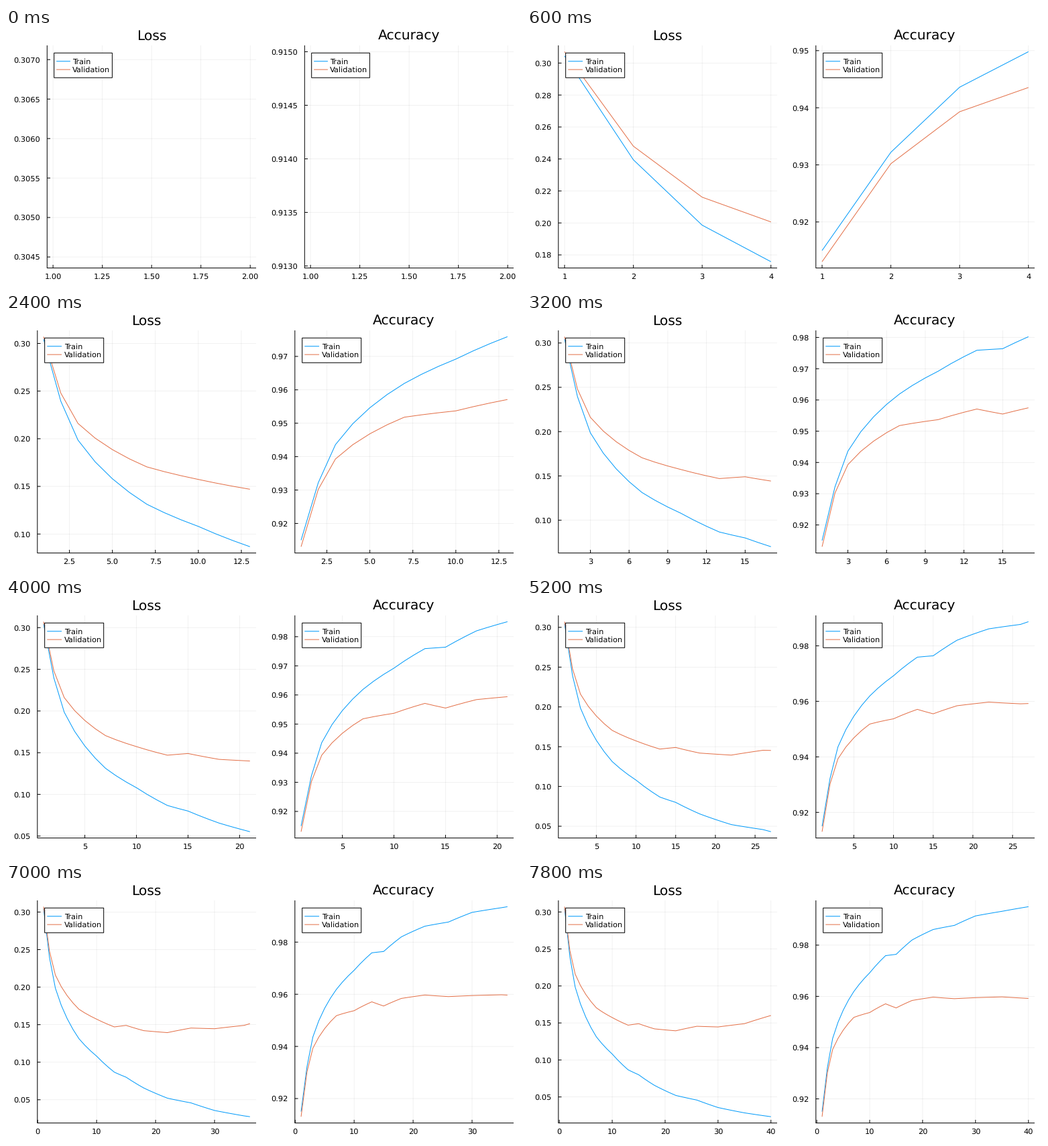
A matplotlib script for the animation above (8000 ms loop, 768x384 px).

```python
import math

import matplotlib.pyplot as plt
import numpy as np
from matplotlib.animation import FuncAnimation
from matplotlib.patches import Rectangle

W, H, DPI = 768, 384, 100
PT = 72 / DPI                      # points per pixel
EPOCHS, INTERVAL = 40, 200
TOP, BOTTOM = 26, 358.6
BLUE, ORANGE = "#009AFA", "#E36F47"
SMALL, LARGE = 11.4, 20.3          # text sizes in pixels
DIGIT = 0.636 * SMALL
NICE = [(5, 0.9), (3, 0.2), (2.5, 0.5), (2, 0.7), (1, 1.0)]

plt.rcParams.update({"font.family": "DejaVu Sans", "text.hinting": "none",
                     "path.snap": False})


def curve(*values):
    """Metric per epoch, straight in log(epoch) between the knots."""
    knots = [1, 2, 3, 7, 10, 13, 15, 18, 22, 26, 30, 35, 40]
    return np.interp(np.log(np.arange(1, EPOCHS + 1)), np.log(knots), values)


train_loss = curve(.30444, .2395, .1986, .1313, .108, .0867, .080,
                   .0656, .0521, .0458, .0357, .0285, .0233)
val_loss = curve(.3071, .248, .2161, .1705, .1573, .147, .149,
                 .142, .1394, .1455, .1446, .149, .1601)
train_acc = curve(.915, .9322, .9436, .9619, .9692, .9759, .9764,
                  .982, .9861, .9877, .9914, .9932, .995)
val_acc = curve(.91304, .9302, .9393, .9518, .9537, .9571, .9555,
                .9584, .9597, .9591, .9595, .9598, .9592)


def widen(lo, hi):
    if hi <= lo:
        hi = lo + 1
    pad = 0.03 * (hi - lo)
    return lo - pad, hi + pad


def nice_ticks(lo, hi):
    """Tick values and decimals with the best count, coverage and step."""
    span = hi - lo
    top = math.ceil(math.log10(span))
    best, result = -math.inf, None
    for power in range(top, top - 4, -1):
        for q, niceness in NICE:
            step = q * 10.0 ** power
            first, last = math.ceil(lo / step), math.floor(hi / step)
            count = last - first + 1
            if not 4 <= count <= 8:
                continue
            cover = math.ceil(hi / step)
            zero = lo <= 0 or (cover < 16 and cover * step < 2 * span)
            score = ((1 - abs(count - 5) / 5) / 4 + zero / 6
                     + 0.5 * span / ((count - 1) * step) + niceness / 4)
            if score > best + 1e-9:
                best = score
                decimals = max(0, -power + (q == 2.5))
                result = np.arange(first, last + 1) * step, decimals
    return result


fig = plt.figure(figsize=(W / DPI, H / DPI), dpi=DPI, facecolor="white")
ax = fig.add_axes([0, 0, 1, 1])


def line(xs, ys, color="black", width=1.0, z=2, **kw):
    ax.plot(xs, ys, color=color, lw=width * PT, zorder=z,
            solid_capstyle="butt", solid_joinstyle="round", **kw)


def grid(xs, ys):
    line(xs, ys, width=0.7, z=1, alpha=0.08)


def text(x, y, s, size=SMALL, ha="center", z=4):
    ax.text(x, y, s, fontsize=size * PT, ha=ha, va="baseline",
            color="black", zorder=z)


def legend(left, width):
    x, y = left + width / 30, TOP + 11.3
    gap, sample = width / 90, width / 15
    start = x + 2 * gap + sample
    ax.add_patch(Rectangle((x, y), start - x + 59, 37, fc="white",
                           ec="black", lw=PT, zorder=5))
    rows = (("Train", BLUE, 49.7), ("Validation", ORANGE, 62.1))
    for label, color, row in rows:
        line([x + gap, x + gap + sample], [row, row], color, z=6)
        text(start, row + 4.2, label, ha="left", z=6)


def panel(offset, title, train, val, n):
    epochs = np.arange(1, n + 1)
    both = np.concatenate([train[:n], val[:n]])
    x0, x1 = widen(1, n)
    y0, y1 = widen(both.min(), both.max())
    xticks, xdec = nice_ticks(x0, x1)
    yticks, ydec = nice_ticks(y0, y1)

    left = offset + 46.8 + DIGIT * (ydec - 2)
    right = offset + 373
    width = right - left

    def px(x):
        return left + (x - x0) / (x1 - x0) * width

    def py(y):
        return BOTTOM - (y - y0) / (y1 - y0) * (BOTTOM - TOP)

    for t in xticks:
        x = px(t)
        grid([x, x], [TOP, BOTTOM])
        line([x, x], [BOTTOM, BOTTOM - 4.7])
        text(x, 375.3, f"{abs(t):.{xdec}f}")
    for t in yticks:
        y = py(t)
        grid([left, right], [y, y])
        line([left, left + 4.7], [y, y])
        text(left - 10.4, y + 4.2, f"{t:.{ydec}f}", ha="right")

    line([left, left, right], [TOP, BOTTOM, BOTTOM])
    if n > 1:
        line(px(epochs), py(train[:n]), BLUE, z=3)
        line(px(epochs), py(val[:n]), ORANGE, z=3)
    text((left + right) / 2 - 0.4, 17.3, title, LARGE)
    legend(left, width)


def draw(i):
    ax.clear()
    ax.set_xlim(0, W)
    ax.set_ylim(H, 0)
    ax.axis("off")
    panel(0, "Loss", train_loss, val_loss, i + 1)
    panel(W / 2, "Accuracy", train_acc, val_acc, i + 1)
    return []


anim = FuncAnimation(fig, draw, frames=EPOCHS, interval=INTERVAL,
                     init_func=lambda: draw(0), repeat=True, repeat_delay=0)
plt.show()
```
